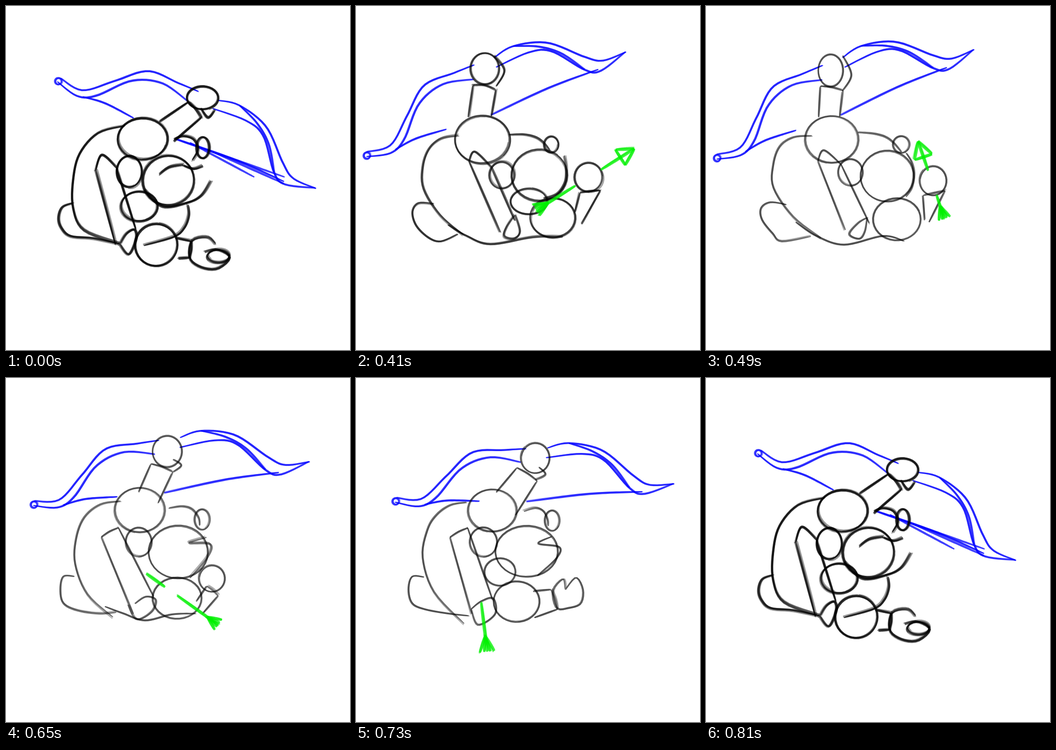
Write an HTML page with a canvas that moves like this. It is 748 px wide and 748 px high and loops after 0.85 s.

```html
<!DOCTYPE html>
<html lang="en">
<head>
<meta charset="utf-8">
<title>Archer sketch</title>
<style>
  html, body { margin: 0; width: 100%; height: 100%; overflow: hidden; background: #fff; }
  canvas { display: block; width: 748px; height: 748px; }
</style>
</head>
<body>
<canvas id="stage" width="748" height="748"></canvas>
<script>
const ctx = document.getElementById('stage').getContext('2d');
const LOOP = 850, STEPS = 36;

let seed = 1;
const random = () => (seed = seed * 16807 % 2147483647) / 2147483647;
const spread = size => (random() * 2 - 1) * size;
const sample = fn => Array.from({ length: STEPS + 1 }, (_, i) => fn(i / STEPS));

// Catmull-Rom curve through flat x,y key points.
function curve(flat) {
  const last = flat.length / 2 - 1;
  return sample(u => {
    const i = Math.min(Math.floor(u * last), last - 1), t = u * last - i;
    return [0, 1].map(axis => {
      const [a, b, c, d] = [-1, 0, 1, 2].map(k => flat[2 * Math.max(0, Math.min(last, i + k)) + axis]);
      return b + t / 2 * (c - a + t * (2 * a - 5 * b + 4 * c - d + t * (3 * (b - c) + d - a)));
    });
  });
}

// Slightly more than one turn, from a random start, like a quick pencil circle.
function round([cx, cy, rx, ry]) {
  const start = random() * 7;
  return sample(u => {
    const angle = start + u * 6.9;
    return [cx + rx * Math.cos(angle), cy + ry * Math.sin(angle)];
  });
}

// A tapered pencil line, filled as one ribbon.
function pencil(pts, width) {
  const left = [], right = [];
  pts.forEach(([x, y], i) => {
    const a = pts[Math.max(0, i - 1)], b = pts[Math.min(STEPS, i + 1)];
    const len = Math.hypot(b[0] - a[0], b[1] - a[1]) || 1;
    const half = width / 2 * (.5 + .5 * Math.sqrt(Math.abs(Math.sin(Math.PI * i / STEPS))));
    const nx = (a[1] - b[1]) / len * half, ny = (b[0] - a[0]) / len * half;
    left.push([x + nx, y + ny]);
    right.unshift([x - nx, y - ny]);
  });
  ctx.beginPath();
  left.concat(right).forEach(p => ctx.lineTo(...p));
  ctx.fill();
}

// One firm line, then fainter ones whose ends wander.
function sketch(shape, { color, alpha, width, passes, wander }) {
  for (let pass = 0; pass < passes; pass++) {
    const size = pass ? wander : 0;
    const [x0, y0, x1, y1] = [size, size, size, size].map(spread);
    ctx.fillStyle = `rgba(${color},${pass ? alpha * .6 : alpha})`;
    pencil(shape().map(([x, y], i) => {
      const u = i / STEPS;
      return [x + x0 + (x1 - x0) * u, y + y0 + (y1 - y0) * u];
    }), pass ? width * .75 : width);
  }
}

// Two sides and a rounded end; bulge pushes the end outwards.
function limb([ax, ay, bx, by, cx, cy, dx, dy, bulge]) {
  const mx = (bx + cx) / 2, my = (by + cy) / 2;
  const ox = mx - (ax + dx) / 2, oy = my - (ay + dy) / 2, k = bulge / Math.hypot(ox, oy);
  return [[ax, ay, bx, by], [bx, by, mx + ox * k, my + oy * k, cx, cy], [cx, cy, dx, dy]];
}

const bowCurves = [
  [260,127, 215,144, 150,170, 112,235, 75,298, 22,312],
  [258,158, 190,168, 138,210, 105,285, 75,315, 22,322],
  [85,308, 130,285, 197,266],
  [304,112, 346,88, 420,82, 500,114, 540,123, 591,105],
  [346,88, 400,90, 450,106, 500,142],
  [308,133, 380,102, 430,101, 500,142, 535,145, 589,105],
  [295,237, 420,181, 530,142]
];

// rounds: centre and radii; limbs: corners and bulge; curves: points passed through.
// bow: position and turn; arrow: hand, angle, lengths either way, gap, barb, vane.
const rest = {
  bow: [115, 165, 43.3], ink: [.68, 5, 4, 3.5],
  rounds: {
    shoulder: [297,289,54,45], head: [354,380,56,54], ear: [268,360,27,34], chest: [290,436,40,32],
    thigh: [327,520,46,46], hand: [428,200,34,25], horn: [427,308,14,23], claw: [462,544,24,14]
  },
  limbs: {
    forearm: [333,252, 397,209, 425,243, 364,294, 2],
    panel: [238,518, 195,357, 240,352, 282,485, 32],
    lowerArm: [370,505, 402,511, 398,548, 375,550, 2]
  },
  curves: {
    back: [258,261, 200,277, 160,322, 146,378, 146,440, 170,488, 247,517],
    belly: [396,432, 398,455, 388,482, 365,502, 300,521],
    tail: [145,428, 122,437, 114,460, 120,482, 140,500, 190,505, 246,517],
    thumb: [424,222, 440,242, 455,226],
    mouth: [446,380, 425,412, 395,428, 340,437, 300,400],
    lash: [386,347, 408,354, 428,347],
    crease: [333,365, 355,350, 385,345],
    brow: [365,290, 385,283, 408,290, 417,312, 405,335],
    wedge: [248,517, 262,495, 280,486, 284,506, 268,540, 248,517],
    lowerHand: [456,517, 438,502, 405,510, 400,548, 425,568, 460,571, 487,547, 460,530, 432,535]
  },
  cord: [[370,289, 606,372], [400,297, 540,372], [440,313, 604,386]]
};
const reach = {
  bow: [25, 320, 0], ink: [.62, 5, 3, 3.5],
  rounds: {
    shoulder: [275,291,61,53], head: [404,366,64,57], ear: [319,374,27,29], chest: [376,425,40,28],
    thigh: [440,457,46,40], hand: [288,133,35,33], fist: [517,364,32,31], horn: [425,302,13,18]
  },
  limbs: {
    forearm: [243,242, 259,172, 310,180, 297,238, 8],
    panel: [324,497, 248,337, 298,357, 338,462, 30],
    lowerArm: [478,430, 502,400, 542,400, 497,479, 2]
  },
  curves: {
    back: [215,281, 178,292, 155,318, 143,355, 147,400, 175,450, 216,490],
    belly: [205,482, 240,500, 285,517, 385,505, 470,492],
    tail: [162,428, 131,430, 125,455, 140,490, 170,512, 205,512, 216,492],
    thumb: [304,108, 329,130, 312,165],
    mouth: [470,330, 466,365, 455,400, 425,420, 380,420],
    brow: [335,284, 365,280, 393,286, 410,298, 420,312],
    wedge: [342,448, 327,488, 335,505, 355,505, 368,490, 342,448]
  },
  arrow: [517, 362, 45, 142, 185, 37, 20, 15]
};
const spin = {
  bow: [26, 331, -2.2], ink: [.55, 4.5, 2, 3],
  rounds: {
    shoulder: [274,290,58,51], head: [394,370,58,55], ear: [314,362,27,29], thigh: [415,464,52,46],
    hand: [271,140,27,35], fist: [494,380,29,32], horn: [425,301,18,18]
  },
  limbs: {
    forearm: [245,242, 249,174, 298,184, 291,240, 2],
    panel: [303,487, 243,338, 294,345, 355,472, 30],
    lowerArm: [475,466, 472,412, 520,402, 485,470, 0]
  },
  curves: {
    back: [230,282, 190,285, 160,305, 146,345, 147,395, 190,458, 250,504],
    belly: [195,470, 240,500, 300,519, 385,500, 430,511],
    tail: [175,432, 140,427, 120,440, 122,465, 145,495, 165,512, 228,501],
    thumb: [297,108, 316,150, 297,185],
    mouth: [436,320, 448,340, 453,365, 448,395, 435,415],
    brow: [330,275, 365,278, 390,285, 408,298, 425,318],
    wedge: [350,460, 330,472, 311,496, 333,506, 345,490, 350,460]
  },
  arrow: [492, 385, -109, 96, 82, 28, 20, 13]
};
const draw = {
  bow: [37, 283, 6.6], ink: [.52, 4.5, 2, 3.5],
  rounds: {
    shoulder: [286,286,56,51], head: [378,380,61,59], ear: [300,357,27,31], thigh: [395,472,57,46],
    hand: [311,145,33,35], fist: [448,436,28,29], horn: [427,305,17,22]
  },
  limbs: {
    forearm: [272,248, 281,178, 332,185, 315,245, 2],
    panel: [302,513, 210,346, 246,325, 345,468, 2],
    lowerArm: [442,508, 450,445, 485,445, 466,505, 1]
  },
  curves: {
    back: [258,265, 205,273, 165,308, 150,365, 156,418, 185,475, 230,506],
    belly: [215,497, 255,512, 302,527, 360,514, 412,512],
    tail: [150,430, 128,432, 123,460, 128,490, 160,508, 205,513, 235,502],
    thumb: [328,160, 350,170, 338,187],
    mouth: [447,348, 400,358, 446,355, 442,385, 405,440],
    brow: [342,277, 375,276, 400,281, 420,300, 424,320],
    wedge: [280,483, 302,512, 330,502, 352,485, 335,465, 310,478]
  },
  arrow: [446, 440, -192.5, 133, 144, 32, 0, 11]
};
const nock = {
  bow: [88, 269, 17.1], ink: [.55, 4.5, 2, 3],
  rounds: {
    shoulder: [297,288,53,46], head: [371,377,68,55], ear: [277,357,30,32], chest: [313,422,34,30],
    thigh: [349,486,50,44], hand: [390,174,31,33], horn: [427,310,16,22]
  },
  limbs: {
    forearm: [305,249, 350,195, 394,224, 347,298, 2],
    panel: [252,513, 204,347, 243,326, 297,482, 2],
    lowerArm: [385,464, 424,460, 438,503, 388,521, 2]
  },
  curves: {
    back: [240,270, 205,276, 175,297, 155,330, 145,390, 170,465, 235,534],
    tail: [148,433, 122,432, 114,460, 122,490, 150,503, 200,512, 245,517],
    thumb: [398,194, 412,210, 390,222],
    mouth: [425,345, 396,360, 442,368, 436,392, 395,430],
    brow: [365,290, 390,283, 408,290, 417,308, 418,322],
    wedge: [250,503, 265,537, 302,514, 298,480, 272,486, 250,503],
    lowerHand: [455,460, 450,437, 428,462, 436,500, 462,500, 488,490, 493,460, 478,434, 455,460]
  },
  arrow: [272, 488, -97, 0, 108, 0, 0, 16]
};

// Halfway between two poses; parts only the first one has stay as they are.
function between(a, b) {
  if (typeof a === 'number') return (a + b) / 2;
  if (Array.isArray(a)) return a.map((v, i) => between(v, b[i]));
  return Object.fromEntries(Object.entries(a).map(([key, v]) => [key, key in b ? between(v, b[key]) : v]));
}

const timeline = [
  [0, rest], [330, reach], [410, between(reach, spin)], [490, spin], [570, draw],
  [650, between(draw, nock)], [730, nock], [770, { ...between(nock, rest), arrow: null }], [810, rest]
];

function paintBow([x, y, turn], cord = []) {
  const pen = { color: '0,0,255', alpha: .75, width: 4.6, passes: 2, wander: 2 };
  ctx.save();
  ctx.translate(x, y);
  ctx.rotate(turn * Math.PI / 180);
  ctx.translate(-25, -320);
  bowCurves.forEach(c => sketch(() => curve(c), pen));
  sketch(() => round([23, 320, 7, 7]), pen);
  ctx.restore();
  cord.forEach(c => sketch(() => curve(c), { ...pen, passes: 1 }));
}

function paintArrow([x, y, angle, front, rear, gap, barb, vane]) {
  const pen = { color: '0,240,0', alpha: .75, width: 7, passes: 2, wander: 3 };
  const line = (...flat) => sketch(() => curve(flat), pen);
  ctx.save();
  ctx.translate(x, y);
  ctx.rotate(angle * Math.PI / 180);
  if (front > gap) line(gap, 0, front, 0);
  line(-gap, 0, -rear, 0);
  if (barb > 0) {
    const base = front - barb * 1.8;
    line(front, 0, base, barb);
    line(base, barb, base, -barb);
    line(base, -barb, front, 0);
  }
  for (const side of [-1, -.4, .4, 1]) line(vane * 2.2 - rear, 0, -rear, vane * side);
  ctx.restore();
}

function paint(pose) {
  seed = 4711;
  ctx.clearRect(0, 0, 748, 748);
  paintBow(pose.bow, pose.cord);

  const [alpha, width, passes, wander] = pose.ink;
  const pen = { color: '0,0,0', alpha, width, passes: Math.round(passes), wander };
  const lines = [...Object.values(pose.curves), ...Object.values(pose.limbs).flatMap(limb)];
  lines.forEach(c => sketch(() => curve(c), pen));
  Object.values(pose.rounds).forEach(r => sketch(() => round(r), pen));

  if (pose.arrow) paintArrow(pose.arrow);
}

function tick(now) {
  const time = now % LOOP;
  paint(timeline.findLast(([start]) => start <= time)[1]);
  requestAnimationFrame(tick);
}
tick(performance.now());
</script>
</body>
</html>
```
